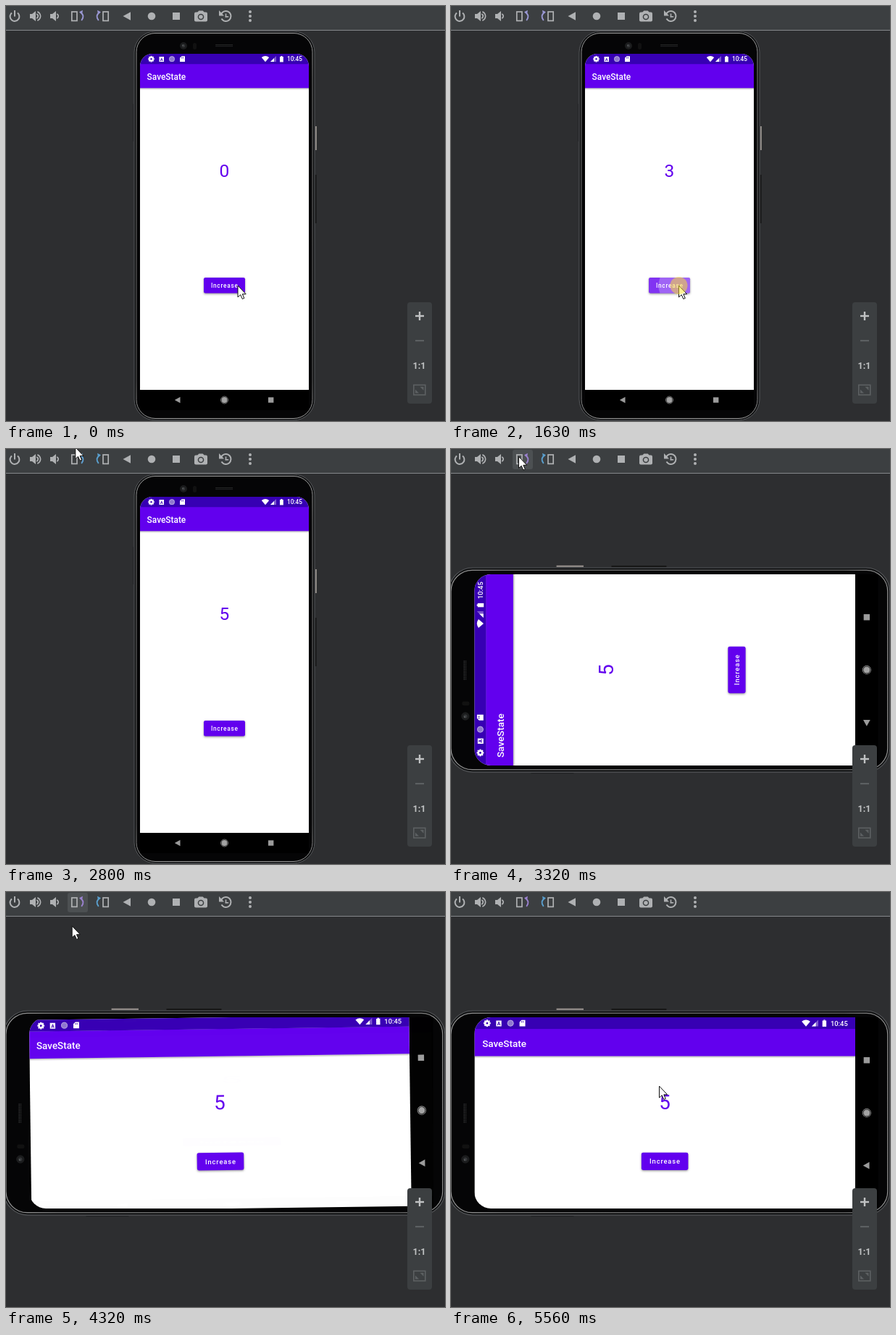
Animation of 606x573 px, one loop 5630 ms. Source, as an HTML page with a canvas:

```html
<!DOCTYPE html>
<html lang="en">
<head>
<meta charset="utf-8">
<title>State after rotation</title>
<style>
html, body { margin: 0; width: 100%; height: 100%; overflow: hidden; background: #2d2e30; }
canvas { display: block; }
</style>
</head>
<body>
<canvas id="stage" width="606" height="573"></canvas>
<script>
const stage = document.getElementById('stage');
const view = stage.getContext('2d');
const sheet = document.createElement('canvas');
let g = view;

const LOOP = 5630, TAU = Math.PI * 2, ZOOM = 1.133;
const SW = 233, SH = 492, NAV = 28;
const PURPLE = '#6200ee', GREY = '#afb1b3';
const CLICKS = [670, 1150, 1490, 1830, 2080];
const TURN_DEVICE = 3260, TURN_SCREEN = 4078, TURN_TIME = 260;

const SPANS = [[0, 0], [130, 130], [270, 340], [670, 1010], [1150, 1700], [1770, 2330],
  [2400, 2940], [3070, 3070], [3260, 3320], [3520, 3720], [3920, 3920],
  [4120, 4660], [4730, 5290], [5360, 5560]];

// time, x, y of the pointer tip
const POINTER = [[0, 320, 386], [130, 318, 386], [270, 316, 386], [340, 314.5, 386],
  [2260, 314.5, 386], [2330, 308, 374], [2400, 285, 330], [2600, 170, 120],
  [2800, 96, -3], [2940, 92.5, 9], [3070, 93.5, 10.5], [3500, 93.5, 10.5],
  [3720, 91, 16], [3920, 90, 18], [4188, 89.5, 20], [4390, 92, 60],
  [4596, 231, 283], [4664, 300, 300], [4734, 338, 285], [4870, 320, 301],
  [5000, 285, 295], [5140, 276, 270], [5200, 296, 258], [5280, 288.5, 268], [5360, 287.5, 268]];

const clamp = v => Math.max(0, Math.min(1, v));
const smooth = v => v * v * (3 - 2 * v);

function snap(t) {
  let span = SPANS[0];
  for (const s of SPANS) if (t >= s[0]) span = s;
  const n = Math.floor((Math.min(t, span[1]) - span[0]) / 68 + 0.13);
  return span[0] + n * 68;
}

function pointerAt(t) {
  for (let i = 1; i < POINTER.length; i++) {
    const a = POINTER[i - 1], b = POINTER[i];
    if (t < b[0]) {
      const k = (t - a[0]) / (b[0] - a[0]);
      return [a[1] + (b[1] - a[1]) * k, a[2] + (b[2] - a[2]) * k];
    }
  }
  return POINTER[POINTER.length - 1].slice(1);
}

function rect(x, y, w, h, color) {
  g.fillStyle = color;
  g.fillRect(x, y, w, h);
}
function round(x, y, w, h, r) {
  g.beginPath();
  g.roundRect(x, y, w, h, r);
}
function dot(x, y, r, color) {
  g.fillStyle = color;
  g.beginPath();
  g.arc(x, y, r, 0, TAU);
  g.fill();
}
function arc(x, y, r, from, to, color, width) {
  g.strokeStyle = color;
  g.lineWidth = width;
  g.beginPath();
  g.arc(x, y, r, from, to);
  g.stroke();
}
function poly(color, ...p) {
  g.fillStyle = color;
  g.beginPath();
  for (let i = 0; i < p.length; i += 2) g.lineTo(p[i], p[i + 1]);
  g.closePath();
  g.fill();
}
function text(str, x, y, font, color, align = 'left', gap = 0) {
  g.font = font + ' Roboto, sans-serif';
  g.letterSpacing = gap + 'px';
  g.textAlign = align;
  g.fillStyle = color;
  g.fillText(str, x, y);
  g.letterSpacing = '0px';
}
function group(fn) {
  g.save();
  fn();
  g.restore();
}

function statusBar(w) {
  rect(0, 0, w, 14.2, '#3700b3');
  for (let i = 0; i < 8; i++) group(() => {
    g.translate(15.5, 7.2);
    g.rotate(i * TAU / 8);
    rect(-1, -4.3, 2, 3, '#fff');
  });
  arc(15.5, 7.2, 2.4, 0, TAU, '#fff', 1.7);
  rect(26.5, 4, 6.5, 7, '#fff');
  text('A', 29.75, 9.8, 'bold 6px', '#3700b3', 'center');
  dot(44, 7.2, 3.9, '#8f78cf');
  arc(44, 7.2, 3.5, 0, TAU, '#b9a8e4', 0.8);
  poly('#fff', 57.5, 3.2, 62, 3.2, 62, 11, 55, 11, 55, 5.7);
  rect(57.3, 4.6, 0.8, 1.8, '#3700b3');
  rect(59.2, 4.6, 0.8, 1.8, '#3700b3');
  const x = w - 60;
  g.fillStyle = '#fff';
  g.beginPath();
  g.moveTo(x, 11.2);
  g.lineTo(x - 5.2, 5);
  g.quadraticCurveTo(x, 1.2, x + 5.2, 5);
  g.fill();
  poly('rgba(255,255,255,.35)', x + 7, 11, x + 15, 11, x + 15, 3);
  poly('#fff', x + 7, 11, x + 12, 11, x + 12, 6);
  rect(x + 20, 4, 4.8, 7.4, '#fff');
  rect(x + 21.4, 3, 2, 1.2, '#fff');
  text('10:45', w - 9, 10.3, '500 8.3px', '#fff', 'right');
}

function button(x, y, t) {
  group(() => {
    g.shadowColor = 'rgba(0,0,0,.4)';
    g.shadowBlur = 3;
    g.shadowOffsetY = 1.3;
    g.fillStyle = PURPLE;
    round(x, y, 57, 21.4, 2.2);
    g.fill();
  });
  group(() => {
    round(x, y, 57, 21.4, 2.2);
    g.clip();
    for (const c of CLICKS) {
      const age = t - c;
      if (age < 0 || age >= 340) continue;
      const fade = 1 - clamp((age - 150) / 190);
      rect(x, y, 57, 22, `rgba(255,255,255,${0.2 * fade})`);
      dot(x + 41, y + 11, 10 + age * 0.13, `rgba(255,255,255,${0.24 * fade})`);
    }
  });
  text('Increase', x + 28.8, y + 13.9, '500 8.3px', '#fff', 'center', 0.74);
}

function navIcons(x, y, dx, dy) {
  const ax = x - dx, ay = y - dy;
  poly('#9b9b9b', ax - 4.5, ay, ax + 3.2, ay - 4.3, ax + 3.2, ay + 4.3);
  dot(x, y, 4, '#a3a3a3');
  arc(x, y, 5, 0, TAU, '#858585', 0.9);
  rect(x + dx - 3.7, y + dy - 3.7, 7.4, 7.4, '#9b9b9b');
}

// App screen with its top left corner at the origin.
function screen(wide, count, t) {
  const w = wide ? SH : SW, h = wide ? SW : SH;
  const cw = wide ? w - NAV : w, ch = wide ? h : h - NAV;
  rect(0, 0, w, h, '#000');
  rect(0, 0, cw, ch, '#fff');
  const shade = g.createLinearGradient(0, 47, 0, 50);
  shade.addColorStop(0, 'rgba(0,0,0,.3)');
  shade.addColorStop(1, 'rgba(0,0,0,0)');
  rect(0, 47, cw, 3, shade);
  rect(0, 14, cw, 33.3, PURPLE);
  statusBar(cw);
  text('SaveState', 9.6, 35.8, '500 11.9px', '#fff');
  text(count, cw / 2, wide ? 112 : 169.5, '24.5px', PURPLE, 'center');
  button(cw / 2 - 28.5, wide ? 164.8 : 309, t);
  if (wide) navIcons(478, 116.5, 0, -64.2);
  else navIcons(116.5, 478, 64.2, 0);
}

// Device body around a display centred on the origin.
function body() {
  rect(125.5, -146, 1.8, 33, '#9b9490');
  rect(125.2, -79, 1.8, 67, '#151515');
  rect(-126.5, -177, 1.2, 52, '#222325');
  g.fillStyle = '#111213';
  round(-124.5, -277, 249, 537, 29);
  g.fill();
  g.strokeStyle = '#55575a';
  g.lineWidth = 1;
  g.stroke();
  const rim = g.createLinearGradient(0, -275, 0, 258);
  rim.addColorStop(0, '#a0a0a0');
  rim.addColorStop(0.12, '#777');
  rim.addColorStop(0.9, '#606060');
  rim.addColorStop(1, '#999');
  g.strokeStyle = rim;
  g.fillStyle = '#050506';
  round(-121.5, -274.5, 243, 532, 26);
  g.fill();
  g.stroke();
  dot(-56.5, -257, 5, '#1b1c1d');
  dot(-56.5, -257, 2.3, '#343638');
  dot(-57.3, -257.8, 0.8, '#66696c');
  round(-43.5, -261, 5, 9, 2);
  g.fillStyle = '#111';
  g.fill();
  for (let x = -12; x < 12; x += 2) {
    rect(x, -259, 1.2, 1.2, '#3b3c3d');
    rect(x, -257, 1.2, 1.2, '#303132');
  }
}

function turning(p) {
  const turn = -Math.PI / 2 * (1 - p);
  const w = SW + (SH - SW) * p, h = SH + (SW - SH) * p;
  rect(-SH / 2, -SW / 2, SH, SW, '#000');
  g.rotate(turn);
  g.beginPath();
  g.rect(-w / 2, -h / 2, w, h);
  g.clip();
  group(() => {
    g.translate(-SH / 2, -SW / 2);
    screen(true, '5', 9999);
  });
  if (p >= 1) return;
  sheet.width = SW * 2;
  sheet.height = SH * 2;
  g = sheet.getContext('2d');
  g.scale(2, 2);
  screen(false, '5', 9999);
  g = view;
  g.globalAlpha = 1 - p;
  g.drawImage(sheet, -w / 2, -h / 2, w, h);
}

function phone(t) {
  const flat = t >= TURN_DEVICE;
  const count = String(CLICKS.filter(c => t >= c + 100).length);
  if (flat) {
    g.translate(311, 305);
    g.scale(ZOOM, ZOOM);
  } else g.translate(301.5, 312);
  group(() => {
    if (flat) g.rotate(-Math.PI / 2);
    body();
  });
  const p = smooth(clamp((t - TURN_SCREEN) / TURN_TIME));
  if (flat) round(-SH / 2, -SW / 2, SH, SW, [20, 0, 0, 20]);
  else round(-SW / 2, -SH / 2, SW, SH, [17, 17, 0, 0]);
  g.clip();
  if (p > 0) return turning(p);
  if (flat) g.rotate(-Math.PI / 2);
  g.translate(-SW / 2, -SH / 2);
  screen(false, count, t);
}

function speaker(x, waves) {
  poly(GREY, x - 7, 11, x - 4, 11, x + 1, 7, x + 1, 21, x - 4, 17, x - 7, 17);
  for (let i = 0; i < waves; i++) arc(x + 1, 14, 3.2 + i * 3.4, -1.2, 1.2, GREY, 1.7);
}

function rotateIcon(x, side, color) {
  g.strokeStyle = GREY;
  g.lineWidth = 1.7;
  g.strokeRect(x - side * 4.6 - 3.6, 8, 7.2, 12.4);
  const ax = x + side * 2;
  g.strokeStyle = color;
  g.lineWidth = 1.9;
  g.beginPath();
  g.moveTo(ax + side * 1.5, 8.5);
  g.quadraticCurveTo(ax + side * 8.5, 13, ax + side * 3.2, 20);
  g.stroke();
  poly(color, ax, 8.2, ax + side * 5, 5.8, ax + side * 4, 11.2);
}

function toolbar(t) {
  rect(0, 0, 606, 33, '#3c3f41');
  rect(0, 33, 606, 1, '#85878a');
  if (t >= 2930 && t < 4390) {
    g.fillStyle = '#4c5052';
    round(85, 1, 28, 27, 3);
    g.fill();
  }
  arc(12, 14.5, 6.4, -0.9, Math.PI + 0.9, GREY, 2);
  rect(11, 6, 2, 8.5, GREY);
  speaker(40, 2);
  speaker(68, 1);
  const lit = t >= 2800;
  rotateIcon(99, 1, lit && t < 2930 ? '#5f9fd0' : lit ? '#9b82d0' : '#9a98d4');
  rotateIcon(133, -1, lit ? '#5a9fce' : '#9a98d4');
  poly(GREY, 161.5, 14, 172, 8.3, 172, 19.7);
  dot(201, 14, 5.3, GREY);
  rect(230, 9, 10, 10, GREY);
  g.fillStyle = GREY;
  round(260, 8.5, 18, 13, 2);
  g.fill();
  poly(GREY, 264, 9, 266.3, 6.5, 271.7, 6.5, 274, 9);
  dot(269, 15, 4.3, '#3c3f41');
  dot(269, 15, 2.8, GREY);
  arc(303.5, 14, 7, -2.7, 2.6, GREY, 2);
  poly(GREY, 294, 6, 294, 13.5, 301, 13.5);
  rect(302.7, 10.5, 1.6, 5, GREY);
  rect(302.7, 14, 4.5, 1.6, GREY);
  for (let y = 8; y < 21; y += 6) dot(337, y, 2, GREY);
}

function zoomPanel() {
  g.fillStyle = '#3c3f41';
  round(554, 409, 34, 140, 4);
  g.fill();
  rect(565, 426.8, 12, 2.4, '#c0c2c3');
  rect(569.8, 422, 2.4, 12, '#c0c2c3');
  rect(565, 461, 12, 2.2, '#5c6062');
  text('1:1', 570.5, 500.5, 'bold 12.5px', '#c0c2c3', 'center');
  g.strokeStyle = '#5c6062';
  g.lineWidth = 1.6;
  g.strokeRect(562.8, 523.3, 16, 13.6);
  poly('#5c6062', 571.5, 525.8, 576.5, 525.8, 576.5, 530.8);
  poly('#5c6062', 565, 529.5, 565, 534.5, 570, 534.5);
}

function pointer(t) {
  const [x, y] = pointerAt(t);
  group(() => {
    g.translate(x, y);
    poly('#fff', 0, 0, 0, 16, 3.7, 12.7, 6.3, 18.5, 8.8, 17.4, 6.3, 11.8, 11.2, 11.8);
    g.strokeStyle = '#111';
    g.lineWidth = 1;
    g.stroke();
  });
  if (CLICKS.some(c => t >= c && t < c + 200)) dot(x, y, 12, 'rgba(255,228,40,.5)');
}

function draw(t) {
  rect(0, 0, 606, 573, '#2d2e30');
  group(() => phone(t));
  toolbar(t);
  zoomPanel();
  pointer(t);
}

const start = performance.now();
function tick(now) {
  draw(snap(Math.max(0, now - start) % LOOP));
  requestAnimationFrame(tick);
}
tick(start);
</script>
</body>
</html>
```
